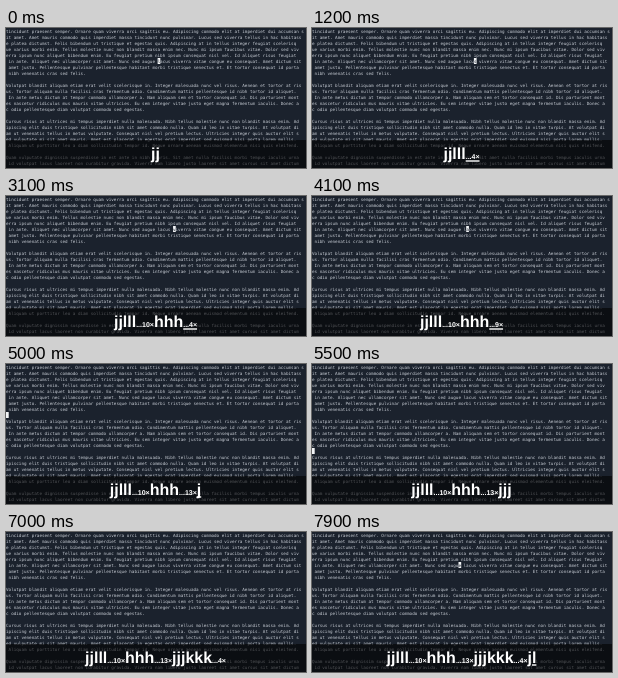
Recreate the animation shown at these times as an HTML page. Size 300 by 140 pixels, loop 8000 ms.

```html
<!DOCTYPE html>
<html lang="en">
<head>
<meta charset="utf-8">
<title>Moving the cursor</title>
<style>
  html, body { margin: 0; width: 100%; height: 100%; overflow: hidden; background: #1b222d; }
  svg { display: block; width: 300px; height: 140px; }
  text { white-space: pre; text-rendering: geometricPrecision; }
  .code { font: 4.27px "DejaVu Sans Mono", "Liberation Mono", monospace; fill: #c9ced6; }
  .under { fill: #1b222d; }
  .keys { font: bold 16px "Liberation Sans", Arial, sans-serif; fill: #fff; text-anchor: middle; }
  .count { font-size: 7px; }
</style>
</head>
<body>
<svg viewBox="0 0 300 140">
  <rect width="300" height="140" fill="#1b222d"/>
  <g id="page"></g>
  <rect id="block" width="2.7" height="6" fill="#f2f4f6"/>
  <text id="glyph" class="code under"></text>
  <rect id="veil" width="300" height="12" fill="#1b222d"/>
  <rect y="112" width="300" height="28" fill="#000" opacity=".6"/>
  <text id="keys" class="keys" x="149.5" y="131"></text>
  <rect id="line" y="132.3" height="1.4" fill="#fff"/>
</svg>
<script>
const LOOP = 8000, COL = 2.57, ROW = 6, HOME = 59;
const rows = [
  "tincidunt praesent semper. Ornare quam viverra orci sagittis eu. Adipiscing commodo elit at imperdiet dui accumsan s",
  "it amet. Amet mauris commodo quis imperdiet massa tincidunt nunc pulvinar. Lucus sed viverra tellus in hac habitass",
  "e platea dictumst. Felis bibendum ut tristique et egestas quis. Adipiscing at in tellus integer feugiat scelerisq",
  "ue varius morbi enim. Tellus molestie nunc non blandit massa enim nec. Nunc mi ipsum faucibus vitae. Dolor sed viv",
  "erra ipsum nunc aliquet bibendum enim. Eu feugiat pretium nibh ipsum consequat nisl vel. Id aliquet risus feugiat",
  " in ante. Aliquet nec ullamcorper sit amet. Nunc sed augue lacus viverra vitae congue eu consequat. Amet dictum sit",
  " amet justo. Pellentesque pulvinar pellentesque habitant morbi tristique senectus et. Et tortor consequat id porta",
  " nibh venenatis cras sed felis.",
  "",
  "Volutpat blandit aliquam etiam erat velit scelerisque in. Integer malesuada nunc vel risus. Aenean et tortor at ris",
  "us. Tortor aliquam nulla facilisi cras fermentum odio. Condimentum mattis pellentesque id nibh tortor id aliquet.",
  " In ante metus dictum at tempor commodo ullamcorper a. Nam aliquam sem et tortor consequat id. Dis parturient mont",
  "es nascetur ridiculus mus mauris vitae ultricies. Eu sem integer vitae justo eget magna fermentum iaculis. Donec a",
  "c odio pellentesque diam volutpat commodo sed egestas.",
  "",
  "Cursus risus at ultrices mi tempus imperdiet nulla malesuada. Nibh tellus molestie nunc non blandit massa enim. Ad",
  "ipiscing elit duis tristique sollicitudin nibh sit amet commodo nulla. Quam id leo in vitae turpis. At volutpat di",
  "am ut venenatis tellus in metus vulputate. Consequat nisl vel pretium lectus. Ultricies integer quis auctor elit s",
  "ed vulputate mi sit amet mauris. Amet est placerat in egestas erat imperdiet sed euismod nisi porta lorem mollis.",
  " Aliquam ut porttitor leo a diam sollicitudin tempor id. Neque ornare aenean euismod elementum nisi quis eleifend.",
  "",
  "Quam vulputate dignissim suspendisse in est ante in nibh mauris. Sit amet nulla facilisi morbi tempus iaculis urna",
  " id volutpat lacus laoreet non curabitur gravida. Viverra nam libero justo laoreet sit amet cursus sit amet dictum"
];

// time, keys pressed so far (letter and count pairs), when the underline goes
const steps = [
  [0, "j2", 0],
  [700, "j2 l1", 900], [900, "j2 l2", 1000], [1000, "j2 l3", 1200],
  [1200, "j2 l4", 1400], [1500, "j2 l5", 1700], [1800, "j2 l6", 2000],
  [2000, "j2 l7", 2100], [2100, "j2 l8", 2200], [2200, "j2 l10", 2300],
  [2300, "j2 l10 h2", 2400], [2400, "j2 l10 h3", 3100],
  [3100, "j2 l10 h4", 3400], [3400, "j2 l10 h5", 3600],
  [3600, "j2 l10 h6", 3700], [3700, "j2 l10 h7", 3900],
  [3900, "j2 l10 h8", 4100], [4100, "j2 l10 h9", 4300],
  [4300, "j2 l10 h10", 4400], [4400, "j2 l10 h11", 4600],
  [4600, "j2 l10 h12", 4700], [4700, "j2 l10 h13", 4900],
  [5000, "j2 l10 h13 j1", 5200], [5200, "j2 l10 h13 j2", 5300],
  [5300, "j2 l10 h13 j3", 5500], [5800, "j2 l10 h13 j3 k1", 6000],
  [6000, "j2 l10 h13 j3 k2", 6100], [6100, "j2 l10 h13 j3 k3", 6300],
  [6800, "j2 l10 h13 j3 k4", 7000], [7300, "j2 l10 h13 j3 k4 j1", 7500],
  [7900, "j2 l10 h13 j3 k4 j1 l1", 8000]
];

const $ = id => document.getElementById(id);
const baseline = row => row * ROW + 4.5;

rows.forEach((words, i) => {
  const t = document.createElementNS("http://www.w3.org/2000/svg", "text");
  t.setAttribute("class", "code");
  t.setAttribute("y", baseline(i));
  t.textContent = words;
  $("page").append(t);
});

function place(el, x, y) {
  el.setAttribute("x", x);
  el.setAttribute("y", y);
}

// Vertical moves go by whole paragraphs; -1 is the one above the view.
function cursorAt(groups) {
  const stops = [-1, 5, 8, 13, 14];
  let col = HOME, stop = 1;
  groups.slice(1).forEach(([key, n]) => {
    if (key === "l") col += n;
    if (key === "h") col -= n;
    if (key === "j") stop += n;
    if (key === "k") stop -= n;
  });
  const row = stops[stop];
  const last = row < 0 ? 0 : Math.max(0, rows[row].length - 1);
  return { row, col: Math.min(col, last) };
}

function showKeys(groups) {
  const label = $("keys");
  label.textContent = "";
  groups.forEach(([key, n]) => {
    label.append(key.repeat(Math.min(n, 3)));
    if (n < 4) return;
    const count = document.createElementNS("http://www.w3.org/2000/svg", "tspan");
    count.setAttribute("class", "count");
    count.textContent = "..." + n + "×";
    label.append(count);
  });
  const [, n] = groups[groups.length - 1];
  const size = label.getNumberOfChars();
  const from = n < 4 ? size - 1 : size - 4 - String(n).length;
  const left = label.getStartPositionOfChar(from).x;
  $("line").setAttribute("x", left);
  $("line").setAttribute("width", label.getEndPositionOfChar(size - 1).x - left);
}

function showCursor({ row, col }) {
  const shown = row < 0 ? "none" : "inline";
  $("block").style.display = $("glyph").style.display = shown;
  if (row < 0) return;
  place($("block"), col * COL, row * ROW);
  place($("glyph"), col * COL, baseline(row));
  $("glyph").textContent = rows[row][col] || "";
}

let current;
function draw(now) {
  const t = now % LOOP;
  const step = steps.findLast(s => s[0] <= t);
  if (step !== current) {
    current = step;
    const groups = step[1].split(" ").map(g => [g[0], +g.slice(1)]);
    showKeys(groups);
    showCursor(cursorAt(groups));
  }
  $("line").style.display = t < step[2] ? "inline" : "none";
  $("veil").style.display = t >= 2000 && t < 2400 ? "inline" : "none";
}

const start = performance.now();
function tick() {
  draw(performance.now() - start);
  requestAnimationFrame(tick);
}
tick();
</script>
</body>
</html>
```
